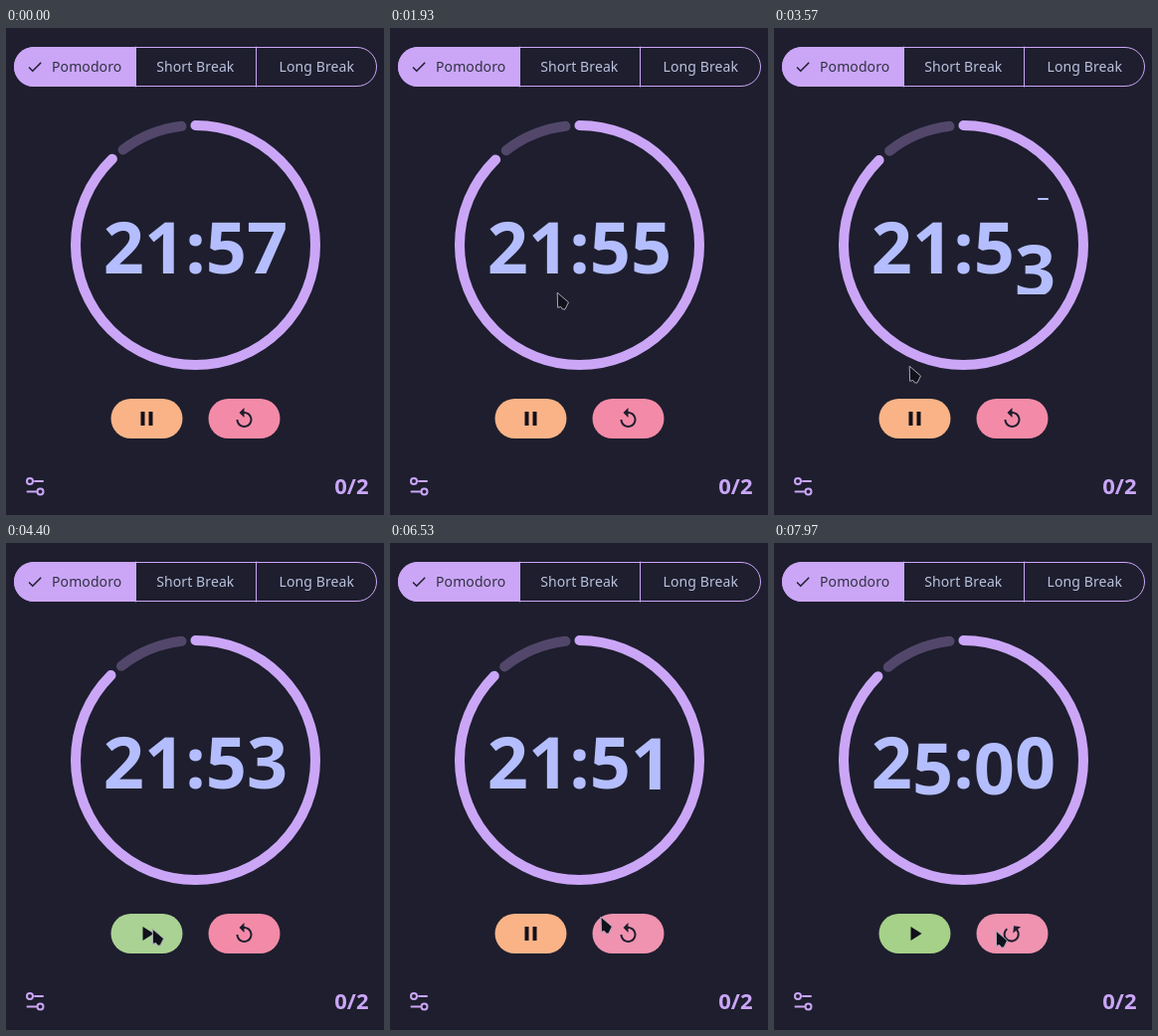
Animation of 380 by 490 pixels, one loop 8 s. Source, as an HTML page with a canvas:

```html
<!DOCTYPE html>
<html lang="en">
<head>
<meta charset="utf-8">
<title>Pomodoro timer</title>
<style>
  html, body { margin: 0; width: 100%; height: 100%; overflow: hidden; background: #1e1e2e; }
  canvas { display: block; width: 380px; height: 490px; }
</style>
</head>
<body>
<canvas id="stage"></canvas>
<script>
const W = 380, H = 490, LOOP = 8000;
const canvas = document.getElementById('stage');
const ctx = canvas.getContext('2d');
const dpr = window.devicePixelRatio || 1;
canvas.width = W * dpr;
canvas.height = H * dpr;

const BASE = '#1e1e2e', INK = '#11111b', MAUVE = '#cba6f7', LAVENDER = '#b4befe';
const PEACH = [250, 179, 135], GREEN = [166, 209, 137], PINK = [243, 139, 168];
const HOVER = [205, 214, 244];
const FONT = '"Noto Sans", sans-serif';

const PAUSE_AT = 4130, RESUME_AT = 5150, RESET_AT = 7740;
const READINGS = [
  [-1000, '21:57'], [385, '21:56'], [1400, '21:55'], [2415, '21:54'], [3432, '21:53'],
  [5180, '21:52'], [6187, '21:51'], [7195, '21:50'], [RESET_AT, '25:00']
];
const POINTER = [
  [1630, 355, 215], [1930, 168, 266], [2200, 152, 298], [2700, 136, 344], [3130, 136, 344],
  [3570, 136, 340], [3900, 147, 388], [5280, 147, 388], [5730, 197, 389], [5930, 212, 380],
  [6300, 212, 380], [7000, 211, 364], [7330, 210, 363], [7640, 223, 390], [LOOP, 223, 390]
];

const REPLAY = new Path2D('M12 5V1L7 6l5 5V7c3.31 0 6 2.69 6 6s-2.69 6-6 6-6-2.69-6-6H4c0 4.42 3.58 8 8 8s8-3.58 8-8-3.58-8-8-8z');
const PLAY = new Path2D('M8 5v14l11-7z');
const PAUSE = new Path2D('M6 19h4V5H6zM14 5v14h4V5z');
const CHECK = new Path2D('M9 16.17 4.83 12l-1.42 1.41L9 19 21 7l-1.41-1.41z');
const ARROW = new Path2D('M0 0 11 9.5 7.5 16.5 5 16.5 3.3 14 .5 14.7z');

const clamp = v => Math.max(0, Math.min(1, v));
const smooth = v => v * v * (3 - 2 * v);
const ramp = (t, start, length) => clamp((t - start) / length);
const mix = (a, b, k) => a.map((v, i) => v + (b[i] - v) * k);
const css = c => `rgb(${c.map(Math.round).join(',')})`;

// Share of the way still to go for a critically damped spring.
function springLeft(ms, omega = 20) {
  const u = omega * Math.max(0, ms) / 1000;
  return (1 + u) * Math.exp(-u);
}

function bezierEase(x) {
  let lo = 0, hi = 1;
  for (let i = 0; i < 20; i++) {
    const s = (lo + hi) / 2, r = 1 - s;
    if (3 * r * r * s * .4 + 3 * r * s * s * .2 + s * s * s < x) lo = s; else hi = s;
  }
  return 3 * (1 - lo) * lo * lo + lo ** 3;
}

function label(text, x, y, size, weight, color, align = 'left') {
  ctx.font = `${weight} ${size}px ${FONT}`;
  ctx.textAlign = align;
  ctx.fillStyle = color;
  ctx.fillText(text, x, y);
}

function icon(path, cx, cy, size, color, angle = 0) {
  ctx.save();
  ctx.translate(cx, cy);
  ctx.rotate(angle);
  ctx.scale(size / 24, size / 24);
  ctx.translate(-12, -12);
  ctx.fillStyle = color;
  ctx.fill(path);
  ctx.restore();
}

function pill(x, y, w, h, r) {
  ctx.beginPath();
  ctx.roundRect(x, y, w, h, r);
}

function drawTabs() {
  pill(8, 19, 122, 40, [20, 0, 0, 20]);
  ctx.fillStyle = MAUVE;
  ctx.fill();
  ctx.strokeStyle = MAUVE;
  ctx.lineWidth = 1;
  pill(8.5, 19.5, 364, 39, 19.5);
  for (const x of [130.5, 251.5]) {
    ctx.moveTo(x, 19);
    ctx.lineTo(x, 59);
  }
  ctx.stroke();
  icon(CHECK, 29, 39, 18, BASE);
  ctx.letterSpacing = '0.1px';
  label('Pomodoro', 46, 44, 14, 500, '#313244');
  label('Short Break', 190.3, 44, 14, 500, '#bac2de', 'center');
  label('Long Break', 312.3, 44, 14, 500, '#bac2de', 'center');
  ctx.letterSpacing = '0px';
}

function arc(from, to, color) {
  const rad = d => (d - 90) * Math.PI / 180;
  ctx.beginPath();
  ctx.arc(190.5, 218.5, 120.5, rad(from), rad(to));
  ctx.lineWidth = 10;
  ctx.lineCap = 'round';
  ctx.strokeStyle = color;
  ctx.stroke();
}

function drawRing(t) {
  let seconds = 1317;
  for (const [at] of READINGS.slice(1, -1)) {
    if (t > at) seconds -= 1 - springLeft(t - at, 14);
  }
  const end = seconds / 1500 * 360, gap = 6.66;
  arc(end + gap, 360 - gap, '#52476a');
  arc(0, end, MAUVE);
}

function drawClock(t) {
  const index = READINGS.findLastIndex(([at]) => t >= at);
  const [at, now] = READINGS[index];
  const before = index ? READINGS[index - 1][1] : now;
  const top = 171, cell = 97, baseline = 247.3;
  const left = springLeft(t - at);
  ctx.font = `700 72px ${FONT}`;
  let x = 190.5 - ctx.measureText(now).width / 2;
  [...now].forEach((char, i) => {
    const width = ctx.measureText(char).width;
    if (char === before[i]) {
      label(char, x, baseline, 72, 700, LAVENDER);
    } else {
      ctx.save();
      ctx.beginPath();
      ctx.rect(x, top, width, cell);
      ctx.clip();
      label(char, x, baseline + cell * left, 72, 700, LAVENDER);
      label(before[i], x, baseline - cell * (1 - left), 72, 700, LAVENDER);
      ctx.restore();
    }
    x += width;
  });
}

function pointerAt(t) {
  const next = POINTER.findIndex(([at]) => at > t);
  if (next < 1) return null;
  const [t0, x0, y0] = POINTER[next - 1], [t1, x1, y1] = POINTER[next];
  const k = smooth((t - t0) / (t1 - t0));
  return [x0 + (x1 - x0) * k, y0 + (y1 - y0) * k];
}

function drawButton(x, color, pointer) {
  const y = 373;
  const over = pointer && pointer[0] > x && pointer[0] < x + 72 && pointer[1] > y && pointer[1] < y + 40;
  pill(x, y, 72, 40, 20);
  ctx.fillStyle = css(over ? mix(color, HOVER, .1) : color);
  ctx.fill();
}

function drawControls(t, pointer) {
  const paused = (t >= PAUSE_AT && t < RESUME_AT) || t >= RESET_AT;
  const green = ramp(t, PAUSE_AT, 150) - ramp(t, RESUME_AT, 150) + ramp(t, RESET_AT, 150);
  drawButton(105.5, mix(PEACH, GREEN, green), pointer);
  icon(paused ? PLAY : PAUSE, 141.5, 393, 24, INK);
  drawButton(203.5, PINK, pointer);
  const turn = bezierEase(ramp(t, RESET_AT, 400));
  icon(REPLAY, 239.5, 393, 24, BASE, -2 * Math.PI * turn);
}

function drawFooter() {
  ctx.strokeStyle = MAUVE;
  ctx.lineWidth = 2;
  ctx.lineCap = 'round';
  ctx.beginPath();
  ctx.arc(24, 456, 3, 0, 7);
  ctx.moveTo(29, 456);
  ctx.lineTo(37, 456);
  ctx.moveTo(37.5, 466.5);
  ctx.arc(34.5, 466.5, 3, 0, 7);
  ctx.moveTo(21.5, 466.5);
  ctx.lineTo(30, 466.5);
  ctx.stroke();
  label('0/2', 364.5, 469, 22, 700, MAUVE, 'right');
}

function drawPointer([x, y]) {
  ctx.save();
  ctx.translate(x + .5, y + .5);
  ctx.fillStyle = INK;
  ctx.strokeStyle = '#a6a8b8';
  ctx.lineWidth = 1;
  ctx.lineJoin = 'round';
  ctx.fill(ARROW);
  ctx.stroke(ARROW);
  ctx.restore();
}

function draw(t) {
  ctx.setTransform(dpr, 0, 0, dpr, 0, 0);
  ctx.fillStyle = BASE;
  ctx.fillRect(0, 0, W, H);
  const pointer = pointerAt(t);
  drawTabs();
  drawRing(t);
  drawClock(t);
  drawControls(t, pointer);
  drawFooter();
  if (pointer) drawPointer(pointer);
}

const start = performance.now();
function frame() {
  draw((performance.now() - start) % LOOP);
  requestAnimationFrame(frame);
}
frame();
</script>
</body>
</html>
```
